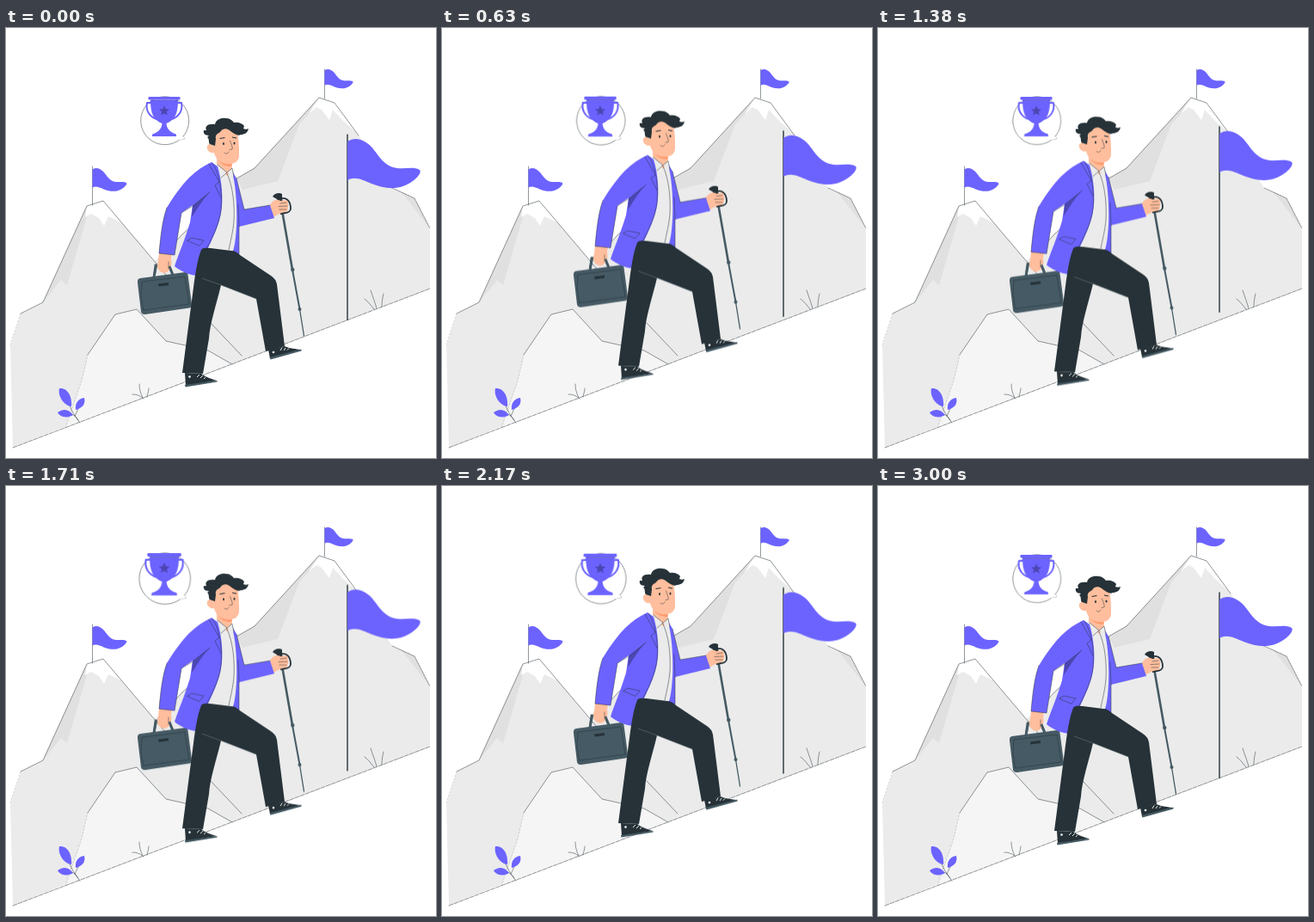
These frames come from a looping animation (500x500 px, 3.04 s). An HTML page without scripts:

```html
<!DOCTYPE html>
<html lang="en">
<head>
<meta charset="utf-8">
<title>Uphill</title>
<style>
  html, body { margin: 0; width: 100%; height: 100%; overflow: hidden; background: #fff; }
  svg { display: block; width: 100%; height: 100%; }
  .ink { fill: none; stroke: #263238; stroke-width: .5; stroke-linecap: round; stroke-linejoin: round; }
  .faint { stroke: #a6abae; }
  .main { fill: #6c63ff; }
  .deep { fill: #4c46b3; }
  .rock { fill: #ebebeb; }
  .shade { fill: #e0e0e0; }
  .dark { fill: #263238; }
  .slate { fill: #455a64; }
  .skin { fill: #ffbe9d; }
  .white { fill: #fff; }

  .walker, .banner { animation: float 3040ms linear infinite; }
  .walker { animation-name: step; }
  .prize { transform-origin: 184px 108px; animation: beat 3040ms ease-in-out infinite; }

  /* 3 s of motion, then a 40 ms rest */
  @keyframes float {
    0%, 98.684%, 100% { transform: none; }
    49.342% { transform: translateY(-10px); }
  }
  @keyframes step {
    0%, 49.342%, 98.684%, 100% { transform: none; }
    24.671%, 74.013% { transform: translateY(-10px); }
  }
  @keyframes beat {
    0%, 9.868%, 19.737%, 29.605%, 49.342%, 59.21%, 69.079%, 78.947%, 100% { transform: scale(1); }
    4.934%, 24.671%, 54.276%, 74.013% { transform: scale(1.1); }
  }
</style>
</head>
<body>
<svg viewBox="0 0 500 500">
  <defs>
    <path id="flag" d="M0 3C6-1 13-1 20 3 35 11 37 31 58 34 68 35 77 32 84 36 87 39 80 47 73 51 59 60 43 58 28 52 17 47 8 43 0 48Z"/>
  </defs>

  <!-- far mountain -->
  <path class="rock" d="M150 434V290L188 258 205 240 245 203 268 175 289 163 364 81 382 87 408 122 449 186 475 198 493 233V303Z"/>
  <path class="shade" d="M364 81 289 163 268 175 275 188 316 178 341 112 352 100ZM459 190 475 198 493 233Z"/>
  <path class="white" d="M364 81 382 87 408 122 392 108 380 95 376 107 367 95 361 92 352 100Z"/>
  <path class="ink" d="M188 258 205 240 245 203 268 175 289 163 364 81 382 87 410 125"/>
  <path class="ink" stroke-dasharray="3 1" d="M449 186 475 198 493 233"/>

  <!-- near mountain -->
  <path class="rock" d="M8 488 5 368 17 332 43 319 94 207 113 201 186 287 240 345 274 381Z"/>
  <path class="shade" d="M94 207 43 319 64 293 71 299 96 213Z"/>
  <path class="white" d="M94 207 113 201 134 226 119 219 114 230 108 221 99 216 92 220Z"/>
  <path class="ink" d="M17 332 43 319 94 207 113 201 186 287M238 343 274 381"/>
  <path class="ink faint" stroke-dasharray="1 3" d="M5 368 17 332"/>

  <!-- foothill -->
  <path fill="#f5f5f5" d="M69 465 88 410 95 380 127 333 152 327 186 364 235 375 263 391Z"/>
  <path class="ink" d="M95 380 127 333 152 327 186 364 235 375 263 391"/>
  <path class="ink faint" stroke-dasharray="2 2" d="M69 465 88 410 95 380"/>
  <path class="ink" stroke-dasharray="5 1.500" d="M8 488 493 303"/>

  <!-- summit flags -->
  <path class="ink" d="M100.500 161V206M370.500 48V82"/>
  <use href="#flag" class="main" transform="translate(100.500 163) scale(.47)"/>
  <use href="#flag" class="main" transform="translate(370.500 48) scale(.39)"/>

  <!-- plants -->
  <path class="ink" d="M86 459C80 452 75 443 72 434M80 451C83 446 84 442 86 438M84 456C80 449 75 448 70 448"/>
  <g class="main">
    <path d="M76 440C67 439 60 428 62 419 72 418 77 429 76 440Z"/>
    <path d="M81 444C80 436 84 431 91 430 93 438 88 442 81 444Z"/>
    <path d="M78 450C72 454 63 453 60 447 67 442 73 443 78 450Z"/>
  </g>
  <path class="ink" d="M160 431C155 427 152 426 147 426M159 430C156 424 155 419 155 414M164 429C165 424 166 422 166 419M428 327C424 322 421 318 417 315M431 326C429 319 426 311 424 305M437 324C437 318 438 313 439 309"/>

  <g class="prize">
    <path class="ink" d="M206 126A28 28 0 1 0 201.500 130.200"/>
    <path class="ink faint" d="M203 130 208 129 206.500 126"/>
    <path fill="none" stroke="#6c63ff" stroke-width="2" d="M169 87H164C162 96 167 103 175 106M199 87H204C206 96 201 103 193 106"/>
    <g class="main">
      <rect x="165.500" y="80" width="37" height="3.600" rx="1"/>
      <path d="M168 84H200C200 98 197 107 186.500 111 187 117 190 120 195 122.500 198 123 198 124 198 126H170C170 124 170 123 173 122.500 178 120 181 117 181.500 111 171 107 168 98 168 84Z"/>
    </g>
    <path class="deep" d="M184 90 185.700 94.200 190 94.500 186.700 97.300 187.800 101.500 184 99.200 180.200 101.500 181.300 97.300 178 94.500 182.300 94.200Z"/>
    <path fill="none" stroke="#4c46b3" stroke-width=".6" d="M168 84H200"/>
  </g>

  <g class="banner">
    <path stroke="#263238" stroke-width="1.400" d="M397 123.500V340"/>
    <use href="#flag" class="main" x="397" y="129"/>
  </g>

  <g class="walker">
    <!-- walking pole and far arm -->
    <g fill="none" stroke="#455a64" stroke-linecap="round">
      <path stroke-width="2.600" d="M321 212 333 281"/>
      <path stroke-width="2" d="M333 281 341.500 327"/>
      <path stroke-width="1.300" d="M341.500 327 346.500 358"/>
    </g>
    <circle class="slate" cx="333.300" cy="281" r="2.200"/>
    <circle class="slate" cx="341.500" cy="327" r="2"/>
    <path class="dark" d="M310 196C312 192 318 191 321 193L321 198 325 216 319 217 315 199Z"/>
    <path fill="none" stroke="#263238" stroke-width="1.800" d="M320 198C327 197 331 202 331 210 331 213 328 215 324 215"/>
    <path class="skin" d="M307 206C309 201 315 198 319 201L326 200C329 202 329 211 326 214 320 214 315 218 310 220Z"/>
    <path class="ink" d="M319 204 326 203M317 207.500 327 207M318 211 326 211"/>
    <path class="main" d="M263 166 268 175 277 211 307 206 312 221 271 231 271 268 262 268Z"/>
    <path class="ink" d="M277 211 307 206M271 231V266M268 175 277 211M271 231 270 205"/>

    <!-- shirt, neck -->
    <path class="rock" d="M244 160 262 165C267 178 269 208 268 230 267 246 266 254 263 262H230Z"/>
    <path class="skin" d="M245 146V160L257 172 263 164 262 153Z"/>
    <path class="rock" d="M245 158 257 168 250 175 242 162ZM257 168 263 163 265 173Z"/>
    <path class="ink" d="M246 159 257 168 250 174M257 168 263 163 265 173M257 169C264 185 266 205 265 225 264 237 261 248 259 258"/>

    <!-- case and hand -->
    <path fill="none" stroke="#455a64" stroke-width="2.800" d="M172 290 174 276H189L194 287"/>
    <path class="skin" d="M178 261H193L192 269C194 277 190 284 184 285 177 284 174 277 177 271Z"/>
    <path class="ink" d="M189 272 189 280"/>
    <path fill="none" stroke="#455a64" stroke-width="2.800" d="M172 290 174.500 277M194 287 190 277"/>
    <path class="slate" d="M156 291 208 284Q211 283.500 211.500 287L216 321Q216.500 325 213 325.500L162 333Q158 333.500 157 330L153 296Q152.500 291.500 156 291Z"/>
    <path class="ink" d="M157 311 158 295 208 289 213 321 160 328Z"/>
    <path class="dark" d="M177 297.500 189 296V299L177.500 300.500Z"/>

    <!-- jacket -->
    <path class="main" d="M239 156 246 161C251 177 253 200 250 215 246 239 230 261 222 288 213 287 203 283 196 277 201 262 208 246 214 226L217 206 204 215 196 264 178 262C180 240 182 223 187 209 196 194 205 182 213 174 221 166 230 160 239 156Z"/>
    <path class="deep" d="M237 191 217 207 216 220C223 209 229 199 237 191Z"/>
    <path class="ink" d="M236 158 248 179 243 183 250 197M237 191 217 207 204 215 196 264 178 262C180 240 182 223 187 209M240 157C248 168 252 189 250 211 248 230 238 247 230 263M211 247 216 244 230 247 225 253Z"/>

    <!-- trousers -->
    <path class="dark" d="M227 258C229 255 233 256 238 256L262 259C266 259 269 261 272 264L308 288Q314 292 315 298L324 370 302 376 291 315 250 299C244 324 237 344 236 361L229 402 205 401 219 294C221 281 223 268 227 258Z"/>
    <path fill="none" stroke="#75848b" stroke-width=".5" d="M228 291 250 299 291 315"/>

    <!-- shoes -->
    <path class="dark" d="M208 401 227 402C232 406 239 408 245 410L209 416ZM305 374 324 370C330 373 337 373 343 374L307 384Z"/>
    <path class="slate" d="M208 415 245.500 410V411.500L208.500 417.500ZM306.500 383 343.500 373.500V375.500L307.500 385.500Z"/>
    <path fill="none" stroke="#fff" stroke-width=".9" d="M222 406 225 403M226 407 229 404M230 408 232 406M319 375 321 371.500M323 375 325 372M327 374.500 329 372.500"/>
    <circle class="white" cx="213.500" cy="405.500" r="1.300"/>
    <circle class="white" cx="311" cy="377" r="1.300"/>

    <!-- head -->
    <path class="skin" d="M242 120C250 112 263 114 269 121 271 130 271 140 271 148 271 156 264 159 257 158 249 157 244 153 242 145 236 146 233 141 234 137 236 134 240 135 241 137Z"/>
    <path fill="#ff9a6c" d="M247 154C252 158 257 159 263 158L262 161C256 161 251 159 247 154Z"/>
    <path class="dark" d="M243 137 237 135C235 133 237 129 234 127L236 125C231 125 229 122 230 119L233 119C231 115 234 111 243 112 244 106 251 104 256 105 260 105 263 107 265 110 270 109 275 111 277 114L276 117C278 118 280 118 282 117 281 122 277 124 273 124 270 126 265 123 260 119 256 116 251 117 249 121 246 123 243 124 244 129Z"/>
    <path class="ink" stroke-width="1" d="M260.500 131C262 136 264 139 263 141L260 141.500M254 145C256 147 258 146 259 144"/>
    <path fill="none" stroke="#263238" stroke-width="1.200" d="M248.500 128.500 254.500 127.500M263 127 268 128"/>
    <ellipse class="dark" cx="253" cy="134.500" rx="1" ry="1.500"/>
    <ellipse class="dark" cx="265.500" cy="134" rx="1" ry="1.500"/>
  </g>
</svg>
</body>
</html>
```
